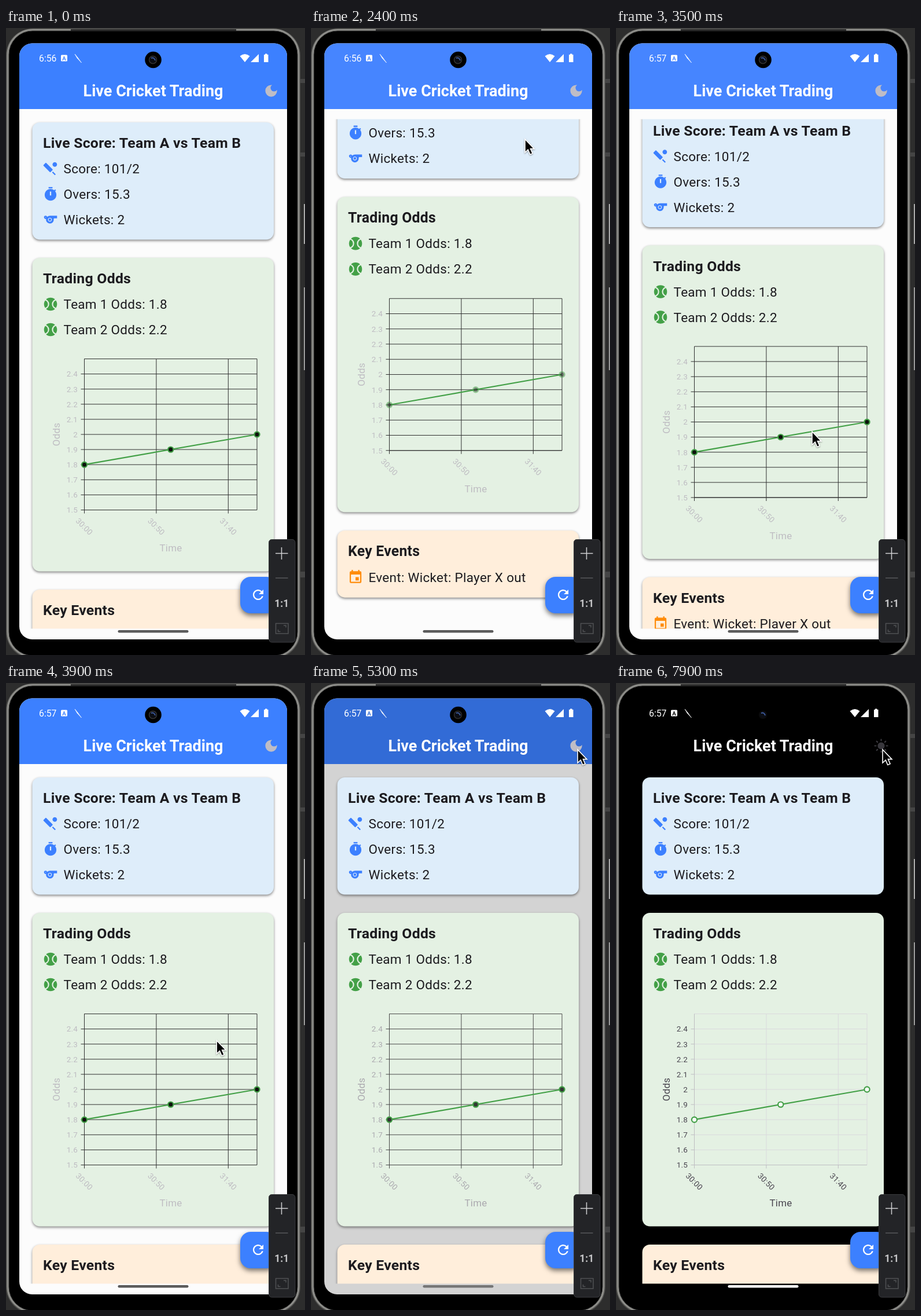
These frames come from a looping animation (517 px wide and 1083 px high, 8000 ms). An HTML page:

```html
<!DOCTYPE html>
<html lang="en">
<head>
<meta charset="utf-8">
<title>Live Cricket Trading</title>
<style>
html, body { margin: 0; width: 100%; height: 100%; overflow: hidden; background: #2d2d2d; }
svg { display: block; width: 100vw; height: 100vh; font-family: Roboto, "Open Sans", sans-serif; }
.card { filter: drop-shadow(0 2.5px 2px #0007); }
.fab { filter: drop-shadow(0 4px 4px #0008); }
.title { font-size: 24.77px; font-weight: 700; letter-spacing: .26px; fill: #1c1b1f; }
.row { font-size: 22.52px; letter-spacing: .28px; fill: #1c1b1f; }
.tick { font-size: 13.5px; letter-spacing: .2px; }
.name { font-size: 16.9px; letter-spacing: .28px; text-anchor: middle; }
#labels { fill: var(--label); }
#grid { stroke: var(--grid); }
#axes { stroke: var(--axis); }
</style>
</head>
<body>
<svg viewBox="0 0 517 1083" preserveAspectRatio="none">
  <defs>
    <clipPath id="screen"><rect x="23" y="26.500" width="463" height="1029.500" rx="22"/></clipPath>
    <clipPath id="view"><rect x="23" y="157.500" width="463" height="880"/></clipPath>
    <path id="bat" d="M15.04 12.79l-9.500-9.500a1 1 0 0 0-1.410 0L1.300 6.110a1 1 0 0 0 0 1.410l9.500 9.500c.39.39 1.020.39 1.410 0l2.830-2.830c.39-.39.39-1.010 0-1.400zM14.340 17.760l1.410-1.410 4.240 4.240-1.410 1.410zM18.500 2a3.500 3.500 0 1 0 .01 0z"/>
    <path id="timer" d="M9 1h6v2H9zM19.030 7.390l1.420-1.420c-.43-.51-.9-.99-1.410-1.410l-1.420 1.420A9 9 0 0 0 12 4a9 9 0 1 0 7.030 3.390zM13 14h-2V8h2z"/>
    <path id="whistle" fill-rule="evenodd" d="M11.230 6c-1.660 0-3.220.66-4.360 1.730A2.500 2.500 0 1 0 5.110 10.920A6 6 0 0 0 11 18a6 6 0 0 0 5.940-6.860c-.09-.6.38-1.130.99-1.130H22V6zM4.500 8a.5.5 0 1 0 .01 0zM11 9a3 3 0 1 0 .01 0zM11 10a2 2 0 1 1-.01 0z"/>
    <g id="ball">
      <circle cx="12" cy="12" r="10"/>
      <g fill="none" stroke="#e4f1e3" stroke-width="1.900"><circle cx="2" cy="12" r="7"/><circle cx="22" cy="12" r="7"/></g>
    </g>
    <path id="event" fill-rule="evenodd" d="M17 12h-5v5h5zM16 1v2H8V1H6v2H5a2 2 0 0 0-2 2v14a2 2 0 0 0 2 2h14a2 2 0 0 0 2-2V5a2 2 0 0 0-2-2h-1V1zM19 19H5V8h14z"/>
    <path id="refresh" d="M17.650 6.350A8 8 0 1 0 19.730 14h-2.080A6 6 0 1 1 16.220 7.780L13 11h7V4z"/>
    <path id="moon" d="M12 3a9 9 0 1 0 9 9c0-.46-.04-.92-.1-1.360a5.400 5.400 0 0 1-4.400 2.260 5.400 5.400 0 0 1-3.140-9.800c-.44-.06-.9-.1-1.360-.1z"/>
  </defs>

  <!-- Phone body -->
  <g fill="#454545">
    <rect x="509" y="88" width="8" height="7"/><rect x="509" y="215" width="8" height="7"/>
    <rect x="509" y="939" width="8" height="10"/>
    <rect x="515" y="304" width="2" height="69" fill="#aaa"/><rect x="515" y="448" width="2" height="143" fill="#999"/>
  </g>
  <rect x="0" y="1" width="509" height="1088" rx="46" fill="#50504e"/>
  <rect x="3.500" y="3.500" width="502" height="1082" rx="43" fill="#000" stroke="#8d8d89" stroke-width="4"/>
  <rect x="5" y="5" width="499" height="1079" rx="41" fill="#000" stroke="#333" stroke-width="1"/>
  <path d="M112 3.500H398" stroke="#2a2a2a" stroke-width="3"/>

  <g clip-path="url(#screen)">
    <rect x="23" y="26" width="464" height="1031" fill="var(--page)"/>
    <g clip-path="url(#view)">
      <g id="content">
        <g class="card">
          <rect x="45.500" y="163" width="417.500" height="202.500" rx="13" fill="#deedfa"/>
          <rect x="45.500" y="397" width="417.500" height="541.500" rx="13" fill="#e4f1e3"/>
          <rect x="45.500" y="970" width="417.500" height="115" rx="13" fill="#ffeedb"/>
        </g>
        <g id="rows"></g>
        <g id="grid"></g>
        <g id="axes"></g>
        <g id="labels"></g>
        <path d="M135.500 754.200L434 702" stroke="#43a047" stroke-width="2.200"/>
        <g id="dots" fill="var(--dot)" stroke="#43a047" stroke-width="2.200"></g>
      </g>
    </g>
    <rect x="23" y="26" width="464" height="114" fill="var(--bar)"/>
    <text x="254.500" y="117.500" text-anchor="middle" font-size="27" font-weight="700" fill="#fff">Live Cricket Trading</text>
    <use id="moonIcon" href="#moon" transform="translate(445 95) scale(1.126)" fill="#bfbdc6"/>
    <g id="sunIcon" transform="translate(458.500 108.500)" fill="#39383d" stroke="#39383d" stroke-width="2.200" stroke-linecap="round"><circle r="5"/></g>

    <!-- Status bar -->
    <g fill="#fff">
      <text id="clock" x="57" y="57.500" font-size="15.800"></text>
      <rect x="95" y="46.500" width="11" height="11" rx="1.500"/>
      <text x="100.500" y="55.500" font-size="9.500" font-weight="700" text-anchor="middle" style="fill:var(--bar)">A</text>
      <path d="M119 45l5 6 6.500 9-7.500-8z" stroke="#fff" stroke-width=".6"/>
      <path d="M404.500 48.500q8.500-7 17 0L413 59zM437 45v14h-14zM446 46h2v-1.500h3.500V46h2v13h-7.500z"/>
    </g>
    <rect x="193.500" y="1040" width="122" height="4.500" rx="2.200" fill="var(--handle)"/>
    <rect class="fab" x="405" y="948" width="63" height="63" rx="18" fill="#3c80ff"/>
    <use href="#refresh" transform="translate(422.500 965.500) scale(1.126)" fill="#fff"/>
  </g>

  <circle cx="254.500" cy="55" r="14.300" fill="#000"/>
  <circle cx="254" cy="55" r="6.500" fill="#0b0d13" stroke="var(--lens)" stroke-width="1.500"/>
  <path d="M251 52q5-2 7 4" fill="none" stroke="#3d5a9c" stroke-width="2"/>

  <!-- Emulator toolbar -->
  <rect x="454.500" y="883.500" width="45.500" height="177.500" rx="5" fill="#232427" stroke="#3c3d40"/>
  <g fill="none" stroke-width="1.500">
    <path d="M466 907.500h21.500M476.500 897v21" stroke="#d0d0d2"/>
    <path d="M466 950h21.500" stroke="#57585b"/>
    <path d="M466.500 1028.500h21.500v17.500h-21.500zM470.500 1039v3.500h4M480 1032h4v3.500" stroke="#505154"/>
  </g>
  <text x="476.800" y="1000" text-anchor="middle" font-size="17.500" font-weight="700" fill="#c6c6c8">1:1</text>

  <path id="pointer" d="M1 2V25l5.200-4.800 3.600 8.300 4.300-1.800-3.600-8.100H17z" fill="#000" stroke="#fff" stroke-width="1.600" style="filter:drop-shadow(0 1px 1px #0006)"/>
</svg>
<script>
const $ = id => document.getElementById(id);
const add = (id, html) => $(id).insertAdjacentHTML('beforeend', html);
const line = (x1, y1, x2, y2) => `<path d="M${x1} ${y1}L${x2} ${y2}"/>`;

const heading = (y, text) => add('rows', `<text class="title" x="64" y="${y + 9}">${text}</text>`);
const row = (y, icon, color, text) => add('rows',
  `<use href="#${icon}" transform="translate(63.500 ${y - 13.5}) scale(1.126)" fill="${color}"/>
   <text class="row" x="99.500" y="${y + 8}">${text}</text>`);

const blue = '#3c80ff', green = '#43a047';
heading(198, 'Live Score: Team A vs Team B');
row(243, 'bat', blue, 'Score: 101/2');
row(287, 'timer', blue, 'Overs: 15.3');
row(331, 'whistle', blue, 'Wickets: 2');
heading(432, 'Trading Odds');
row(477, 'ball', green, 'Team 1 Odds: 1.8');
row(521, 'ball', green, 'Team 2 Odds: 2.2');
heading(1005, 'Key Events');
row(1050, 'event', '#ff8c0a', 'Event: Wicket: Player X out');

// Chart
const left = 135.5, right = 434, top_ = 571.5, base = 832.5, step = 26.1;
for (let i = 0; i <= 10; i++) {
  const y = base - i * step;
  add('grid', line(left, y, right, y));
  if (i == 10) break;
  add('axes', line(left - 6, y, left, y));
  add('labels', `<text class="tick" x="124" y="${y + 4.8}" text-anchor="end">${+(1.5 + i / 10).toFixed(1)}</text>`);
}
['30:00', '30:50', '31:40'].forEach((label, i) => {
  const x = left + i * 124.4;
  add('grid', line(x, top_, x, base));
  add('axes', line(x, base, x, base + 6));
  add('labels', `<text class="tick" text-anchor="middle" transform="translate(${x} 861) rotate(45)" y="4.800">${label}</text>`);
});
add('grid', line(right, top_, right, base));
add('axes', line(left, top_, left, base) + line(left, base, right, base));
add('labels', `<text class="name" x="285" y="904">Time</text>
  <text class="name" transform="translate(93 702) rotate(-90)">Odds</text>`);
for (let i = 0; i < 3; i++)
  add('dots', `<circle cx="${left + i * 149.25}" cy="${754.2 - i * step}" r="4.600"/>`);
for (let a = 0; a < 360; a += 45)
  add('sunIcon', `<path d="M0 -9V-11" transform="rotate(${a})"/>`);

// Keys are [time, value, ...]; values ease between neighbours.
function track(keys, t) {
  const n = keys.findIndex(k => k[0] > t);
  if (n == 0) return keys[0].slice(1);
  if (n < 0) return keys.at(-1).slice(1);
  const a = keys[n - 1], b = keys[n], u = (t - a[0]) / (b[0] - a[0]), e = u * u * (3 - 2 * u);
  return a.slice(1).map((v, i) => v + (b[i + 1] - v) * e);
}
const mix = (a, b, k) => `rgb(${a.map((v, i) => Math.round(v + (b[i] - v) * k))})`;
const grey = v => [v, v, v];

const scrollKeys = [[1000, 0], [1450, 101], [3150, 101], [3500, 21.5], [3650, 0]];
const stretchKeys = [[2000, 0], [2350, 1], [2450, 1], [2700, 0]];
const tintKeys = [[1000, 0], [1200, 1], [3550, 1], [3750, 0]];
const themeKeys = [[5250, 0], [5450, 1]];
const dotKeys = [[1000, 1], [1050, 0], [2300, 0], [2500, 1], [5300, 1], [5350, 0], [6750, 0], [7000, 1]];
const pointerKeys = [[650, 540, 760], [1000, 338, 620], [1500, 334, 409], [1700, 334, 409], [2350, 369, 190],
  [2500, 369, 190], [3150, 340, 612], [3500, 338, 695], [3700, 338, 740], [4400, 464, 117], [4800, 464, 117], [5100, 460, 113]];

function draw(t) {
  const [scroll] = track(scrollKeys, t), [stretch] = track(stretchKeys, t);
  const [tint] = track(tintKeys, t), [dark] = track(themeKeys, t);
  const colors = {
    page: [grey(252), grey(0)],
    bar: [[60 + 10 * tint, 128 + 5 * tint, 255], grey(0)],
    label: [[190, 188, 194], [73, 69, 79]],
    grid: [grey(48), [218, 217, 221]],
    axis: [grey(48), [190, 189, 194]],
    dot: [[12, 18, 12], grey(255)],
    handle: [grey(92), grey(255)],
    lens: [grey(52), grey(10)]
  };
  for (const name in colors)
    document.documentElement.style.setProperty('--' + name, mix(...colors[name], dark));
  const k = 1 + .0058 * stretch;
  $('content').setAttribute('transform', `translate(0 ${1037 * (1 - k) - scroll * k}) scale(1 ${k})`);
  $('dots').setAttribute('opacity', track(dotKeys, t)[0]);
  $('moonIcon').style.display = dark < .5 ? '' : 'none';
  $('sunIcon').style.display = dark < .5 ? 'none' : '';
  $('clock').textContent = t < 3000 ? '6:56' : '6:57';
  $('pointer').setAttribute('transform', `translate(${track(pointerKeys, t).join(' ')})`);
}

const start = performance.now();
function tick() {
  draw((performance.now() - start) % 8000);
  requestAnimationFrame(tick);
}
tick();
</script>
</body>
</html>
```
